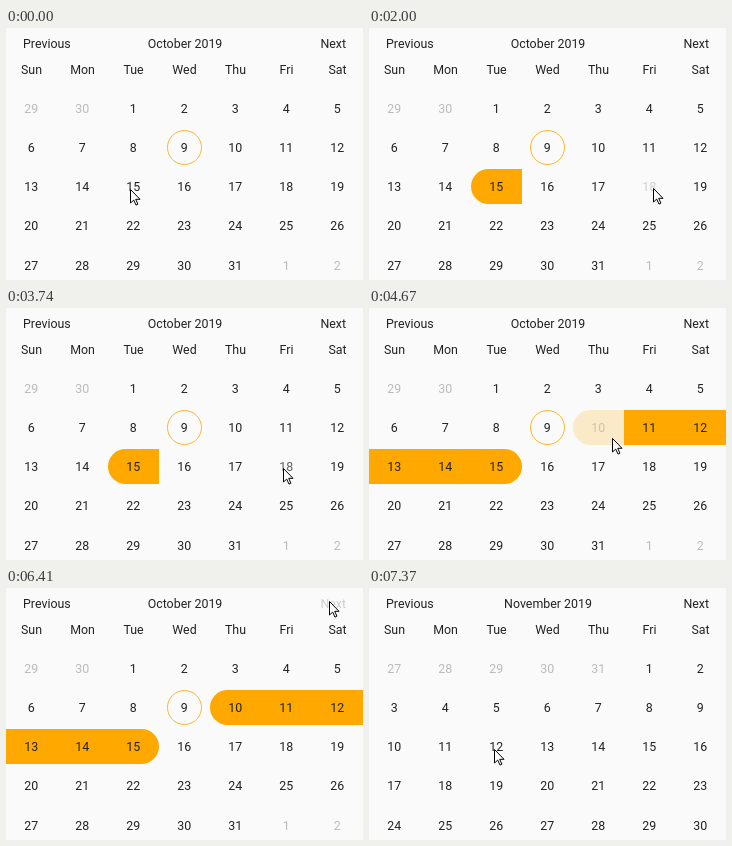
These frames come from a looping animation (357 px wide and 252 px high, 8000 ms). An HTML page with a canvas:

```html
<!DOCTYPE html>
<html lang="en">
<head>
<meta charset="utf-8">
<style>
  html, body { margin: 0; width: 100%; height: 100%; overflow: hidden; background: #fafafa; }
  canvas { display: block; }
</style>
</head>
<body>
<canvas id="stage" width="357" height="252"></canvas>
<script>
const ctx = document.getElementById('stage').getContext('2d');
const LOOP = 8000, CELL = 51, ROW = 39.15, PILL = 35;
const INK = '#222', MUTED = '#bbb', ORANGE = '#ffa800', RING = '#ffb52e', PAPER = '#fafafa';
const WEEK = ['Sun', 'Mon', 'Tue', 'Wed', 'Thu', 'Fri', 'Sat'];
const OCTOBER = { title: 'October 2019', lead: 2, days: 31, previous: 30, today: 9 };
const NOVEMBER = { title: 'November 2019', lead: 5, days: 30, previous: 31 };
const MONTH_CHANGE = 6470;

// Selected range from a given time; no end means only the start is chosen.
const ranges = [
  { at: 1140, start: 15 },
  { at: 2170, start: 15, end: 18 },
  { at: 3470, start: 15 },
  { at: 4570, start: 10, end: 15 },
];
const presses = [
  { on: 970, off: 1140, key: 15 },
  { on: 2000, off: 2170, key: 18 },
  { on: 3300, off: 3470, key: 18 },
  { on: 4240, off: 4570, key: 10 },
  { on: 6240, off: 6410, key: 'Next' },
];
// Pointer moves: start and end time, destination, downward sag.
const origin = [124, 161];
const moves = [
  { from: 1270, to: 1770, point: [284, 160], sag: 17 },
  { from: 2350, to: 2640, point: [284, 166], sag: 0 },
  { from: 3620, to: 4070, point: [243, 130], sag: 0 },
  { from: 4690, to: 5110, point: [215, 192], sag: 0 },
  { from: 5310, to: 6070, point: [323, 13], sag: 0 },
  { from: 6500, to: 7210, point: [116, 173], sag: 0 },
  { from: 7210, to: 7370, point: [125, 161], sag: 0 },
];

const clamp = v => Math.min(1, Math.max(0, v));
const ease = v => { const p = clamp(v); return p * p * (3 - 2 * p); };

function opacity(key, t) {
  const press = presses.findLast(p => p.key === key && t >= p.on);
  return press ? 0.2 + 0.8 * ease((t - press.off - 120) / 250) : 1;
}

function pointer(t) {
  let [x, y] = origin;
  for (const { from, to, point, sag } of moves) {
    if (t < from) break;
    const p = ease((t - from) / (to - from));
    x += (point[0] - x) * p;
    y += (point[1] - y) * p + sag * Math.sin(Math.PI * p);
  }
  return [Math.round(x) + 0.5, Math.round(y) + 0.5];
}

function label(text, x, y, color = INK, align = 'center') {
  ctx.fillStyle = color;
  ctx.textAlign = align;
  ctx.fillText(text, x, y);
}

function drawDay(month, index, range, t) {
  const day = index - month.lead + 1;
  const x = index % 7 * CELL, top = Math.round(63 + Math.floor(index / 7) * ROW);
  const outside = day < 1 || day > month.days;
  const shown = day < 1 ? day + month.previous : outside ? day - month.days : day;
  ctx.globalAlpha = outside || month !== OCTOBER ? 1 : opacity(day, t);

  if (range && day >= range.start && day <= (range.end ?? range.start)) {
    const left = day === range.start ? PILL / 2 : 0;
    const right = day === range.end ? PILL / 2 : 0;
    ctx.fillStyle = ORANGE;
    ctx.beginPath();
    ctx.roundRect(x, top, CELL, PILL, [left, right, right, left]);
    ctx.fill();
  }
  if (day === month.today) {
    ctx.strokeStyle = RING;
    ctx.lineWidth = 1;
    ctx.beginPath();
    ctx.arc(x + CELL / 2, top + PILL / 2, 17, 0, 2 * Math.PI);
    ctx.stroke();
  }
  label(shown, x + CELL / 2 - 0.3, top + 22, outside ? MUTED : INK);
  ctx.globalAlpha = 1;
}

const arrow = new Path2D('M0 0V13.5L3.2 10.6L5.5 15.6L7.4 14.7L5.2 9.8H9.5Z');

function draw(t) {
  const month = t < MONTH_CHANGE ? OCTOBER : NOVEMBER;
  const range = month === OCTOBER && ranges.findLast(r => t >= r.at);
  ctx.fillStyle = PAPER;
  ctx.fillRect(0, 0, 357, 252);
  ctx.font = '12.4px Roboto, sans-serif';

  label('Previous', 17, 20, INK, 'left');
  label(month.title, 179, 20);
  ctx.globalAlpha = opacity('Next', t);
  label('Next', 340, 20, INK, 'right');
  ctx.globalAlpha = 1;
  WEEK.forEach((name, i) => label(name, (i + 0.5) * CELL, 46));
  for (let i = 0; i < 35; i++) drawDay(month, i, range, t);

  ctx.save();
  ctx.translate(...pointer(t));
  ctx.fillStyle = '#fff';
  ctx.strokeStyle = '#000';
  ctx.lineWidth = 1;
  ctx.fill(arrow);
  ctx.stroke(arrow);
  ctx.restore();
}

const began = performance.now();
function tick() {
  draw((performance.now() - began) % LOOP);
  requestAnimationFrame(tick);
}
tick();
</script>
</body>
</html>
```
